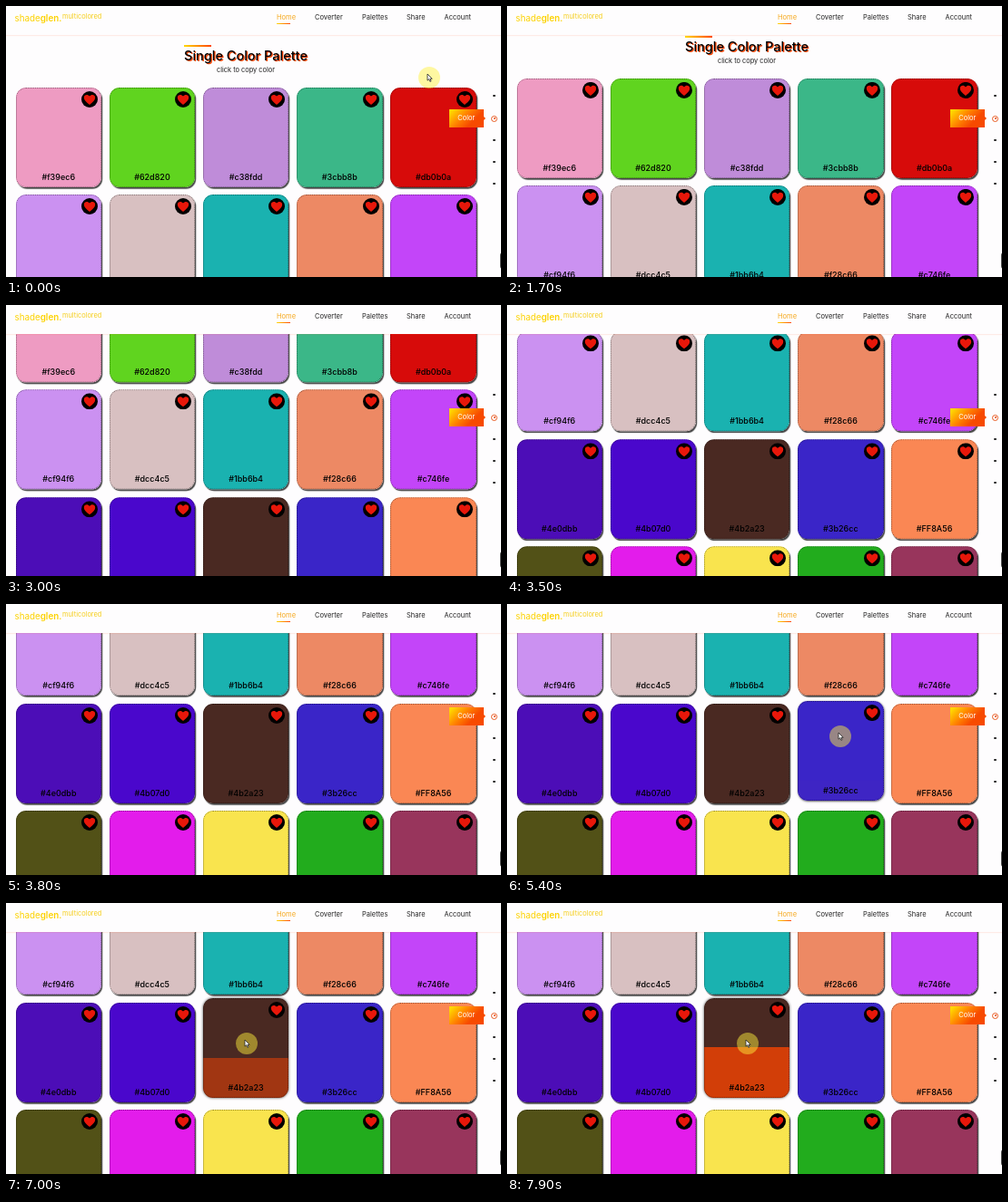
Write an HTML page that moves like this. It is 545 by 299 pixels and loops after 8 s.

```html
<!DOCTYPE html>
<html lang="en">
<head>
<meta charset="utf-8">
<title>Single Color Palette</title>
<style>
html, body { margin: 0; width: 100%; height: 100%; overflow: hidden; background: #fefdfe; }
#stage { position: relative; width: 545px; height: 299px; overflow: hidden; background: #fefdfe;
  font: 7.5px/10px Inter, sans-serif; color: #222; white-space: nowrap; }
#stage * { position: absolute; box-sizing: border-box; }
#page { left: 0; top: 0; width: 545px; height: 600px; }
.bar { background: linear-gradient(90deg, #ffd800, #ff4500); }
#page .bar { left: 196px; top: 42.5px; width: 30px; height: 2px; }
h1 { left: 164px; top: 45px; width: 200px; margin: 0; text-align: center;
  font: 500 14.5px/20px Inter, sans-serif; color: #000; text-shadow: 1.2px 1px .5px #ff4500; }
p { left: 164px; top: 66.3px; width: 200px; margin: 0; text-align: center; font-size: 7.4px; }
.card { width: 94.5px; height: 110px; border-radius: 11px; }
.fill { inset: 0; border-radius: 11px; overflow: hidden; filter: brightness(.98); }
.fill::after { content: ""; position: absolute; inset: 0; border: 1px dotted #0006; border-radius: 11px; }
.fill i { left: 0; right: 0; bottom: 0; background: #ff4500; opacity: 0; }
.card b { left: 0; width: 100%; top: 94px; text-align: center; color: #000; font-size: 9px; font-weight: 500; }
.card svg { left: 72.5px; top: 4px; }
header { left: 0; top: 0; width: 545px; height: 32px; background: #fefdfe; box-shadow: 0 1px 1px #ff450018; }
header .bar { left: 298px; top: 18.5px; width: 15px; height: 1.5px; }
#logo { left: 9.5px; top: 8px; font-size: 9.8px; line-height: 12px; color: #fcd200; }
#logo b { position: static; font-weight: 600; }
#tag { left: 62px; top: 7px; font-size: 7.4px; color: #f5cf1c; }
#tip { left: 488px; top: 114px; width: 37.5px; height: 19.5px; line-height: 20px; text-align: center; color: #fff;
  background: linear-gradient(135deg, #ffd500 8%, #ff8000 42%, #f74a00 68%); }
#tip::after { content: ""; position: absolute; left: 37px; top: 6.7px; border: 3px solid transparent; border-left-color: #f74a00; }
.dot { left: 536.4px; width: 2.2px; height: 2.2px; border-radius: 50%; background: #222; }
#ring { left: 534px; top: 120.5px; width: 7px; height: 7px; border: 1px solid #e85a20; border-radius: 50%; }
#ring i { left: 1.5px; top: 1.5px; width: 2px; height: 2px; border-radius: 50%; background: #e84a10; }
#thumb { left: 543.5px; top: 272px; width: 6px; height: 18px; border-radius: 3px; background: #444; }
#cursor { left: -12px; top: -12px; overflow: visible; }
</style>
</head>
<body>
<div id="stage">
  <div id="page">
    <div class="bar"></div>
    <h1>Single Color Palette</h1>
    <p>click to copy color</p>
  </div>
  <header>
    <span id="logo">shade<b>glen.</b></span>
    <span id="tag">multicolored</span>
    <div class="bar"></div>
  </header>
  <div id="tip">Color</div>
  <div id="ring"><i></i></div>
  <div id="thumb"></div>
  <svg id="cursor" width="24" height="24">
    <circle cx="12" cy="12" r="12" fill="#fff03c" fill-opacity=".48"/>
    <path d="M10 8v7.2l1.7-1.5 1.2 2.7 1.2-.6-1.2-2.5h2.3z" fill="#fff" stroke="#222" stroke-width=".8"/>
  </svg>
</div>
<script>
const $ = id => document.getElementById(id);
const page = $('page'), cursor = $('cursor'), header = document.querySelector('header');
const colors = ('f39ec6 62d820 c38fdd 3cbb8b db0b0a cf94f6 dcc4c5 1bb6b4 f28c66 c746fe ' +
  '4e0dbb 4b07d0 4b2a23 3b26cc FF8A56 545317 e81df0 fee950 23b01e 9b365e').split(' ');

function add(parent, html) {
  parent.insertAdjacentHTML('beforeend', html);
  return parent.lastElementChild;
}

const cards = colors.map((c, i) => add(page, `<div class="card" style="left:${10.5 + i % 5 * 103.2}px;top:${
  90 + Math.floor(i / 5) * 118.4}px"><div class="fill" style="background:#${c}"><i></i></div><b>#${c}</b>
  <svg width="18" height="18"><circle cx="9" cy="9" r="9"/><path fill="#e8170a"
  d="M9 15C5 11.7 2.8 9.8 2.8 7.1C2.8 3.7 7 2.8 9 5.6C11 2.8 15.2 3.7 15.2 7.1C15.2 9.8 13 11.7 9 15z"/></svg></div>`));

[['Home', 298], ['Coverter', 340], ['Palettes', 392], ['Share', 441], ['Account', 482.5]].forEach(([word, x], i) =>
  add(header, `<span style="left:${x}px;top:7.5px;${i ? '' : 'color:#f5a81c'}">${word}</span>`));
for (const y of [99, 148, 172, 196]) add($('stage'), `<i class="dot" style="top:${y - 1.1}px"></i>`);
$('stage').append(cursor);

// The CSS "ease" curve, solved by bisection
function ease(x) {
  if (x <= 0) return 0;
  if (x >= 1) return 1;
  let lo = 0, hi = 1, s;
  for (let i = 0; i < 20; i++) {
    s = (lo + hi) / 2;
    if (.75 * s * (1 - s) + s ** 3 < x) lo = s; else hi = s;
  }
  return .3 * s * (1 - s) ** 2 + 3 * s * s * (1 - s) + s ** 3;
}

// Piecewise linear track of [time, ...values]
function track(keys, t) {
  const n = keys.findIndex(k => k[0] > t);
  if (n < 0) return keys.at(-1).slice(1);
  const a = keys[Math.max(n - 1, 0)], b = keys[n];
  const f = n ? (t - a[0]) / (b[0] - a[0]) : 0;
  return a.slice(1).map((v, i) => v + (b[i + 1] - v) * f);
}

// Hover transition with a shortened way back
function hover(t, enter, leave, span) {
  if (t < leave) return ease((t - enter) / span);
  const top = ease((leave - enter) / span);
  return top * (1 - ease((t - leave) / (span * top)));
}

const scroll = [[1500, 0], [1700, 10], [2300, 54], [3000, 114.5], [3800, 217]];
const pointer = [[100, 466, 79], [400, 562, 92], [4900, 562, 112], [5250, 385, 144], [5350, 367, 146],
  [5420, 367, 146], [5700, 265, 155]];
const hovers = [[13, 5230, 5540], [12, 5550, 1e5]];

const shadow = lift => `${1.2 - 1.2 * lift}px ${1.8 - 1.8 * lift}px ${1 + 2 * lift}px #444`;

function draw(now) {
  const t = now % 8000;
  page.style.transform = `translateY(${-track(scroll, t)[0]}px)`;
  const [x, y] = track(pointer, t);
  cursor.style.transform = `translate(${x}px,${y}px)`;
  for (const [i, enter, leave] of hovers) {
    const card = cards[i], lift = hover(t, enter, leave, 500), p = hover(t, enter, leave, 5000);
    card.style.transform = `translateY(${-5 * lift}px)`;
    card.style.boxShadow = shadow(lift);
    const fill = card.querySelector('i').style;
    fill.height = 20 + 40 * p + '%';
    fill.opacity = p;
  }
  requestAnimationFrame(() => draw(performance.now()));
}

for (const card of cards) card.style.boxShadow = shadow(0);
draw(0);
</script>
</body>
</html>
```
